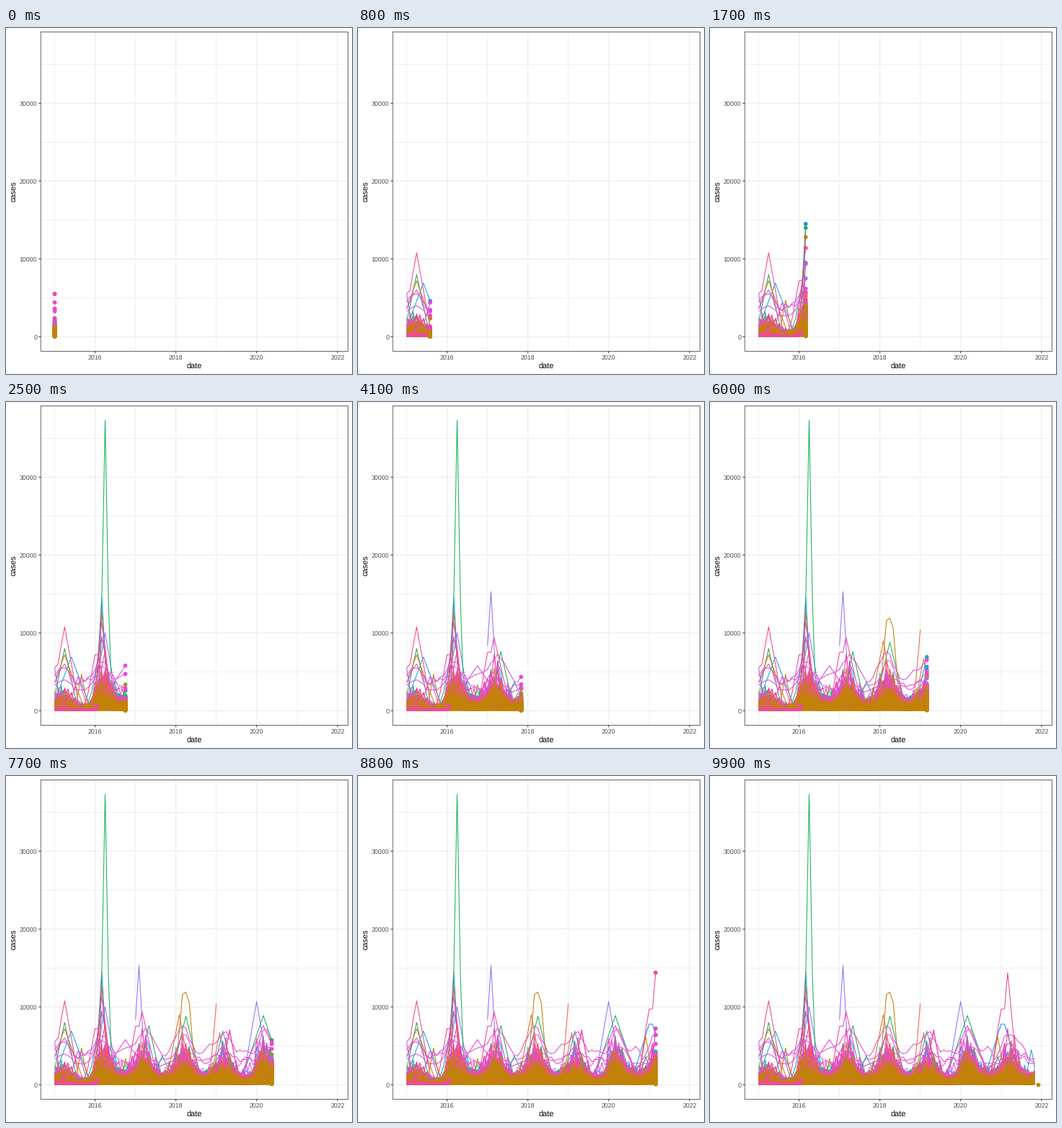
Recreate the animation shown at these times as a matplotlib script. Size 480 px wide and 480 px high, loop 10000 ms.

```python
import numpy as np
import matplotlib.pyplot as plt
from matplotlib.animation import FuncAnimation
from matplotlib.collections import LineCollection, PolyCollection

plt.rcParams["font.family"] = ["Liberation Sans", "DejaVu Sans"]
plt.rcParams["text.hinting"] = "none"

SIZE, FRAMES, MONTHS = 480, 100, 84
LEFT, RIGHT, TOP, BOTTOM = 48.2, 474.5, 5.5, 448.4
GOLD, ORANGE, RED = "#c08405", "#d6741c", "#ec6a53"
PINK, MAGENTA, PURPLE = "#f2479f", "#e54bd8", "#9b70ff"
BLUE, CYAN, TEAL = "#1e90f8", "#17a9d6", "#1fb39a"
GREEN, OLIVE = "#1db45c", "#8a9a1c"

rng = np.random.default_rng(12)
MONTH = np.arange(MONTHS)


def day(date):
    return (np.datetime64(date) - np.datetime64("2015-01-01")).astype(int)


DAYS = np.array([day(f"{2015 + m // 12}-{m % 12 + 1:02d}-01") for m in MONTH])


def px(days):
    return 67.55 + days * 387.55 / DAYS[-1]


def py(cases):
    return 428.3 - np.asarray(cases) * 0.010797


# Yearly spring wave that scales every series
SEASON = np.exp(-((MONTH - 2.4 + 6) % 12 - 6) ** 2 / 9)
PEAK = np.repeat([3000, 6200, 5600, 6000, 4700, 6200, 5600], 12)
ENV = PEAK * (0.33 + 0.67 * SEASON)


def series(scale, rough=0.34):
    return ENV * scale * np.exp(rough * rng.normal(size=MONTHS))


def crowd(n, colors, low, high, power=1.0):
    scales = low + (high - low) * rng.random(n) ** power
    return [(colors[i % len(colors)], series(s)) for i, s in enumerate(scales)]


def outbreak(color, *tents, first=0, last=MONTHS - 2):
    """A series with tent-shaped outbreaks given as (month, height, half width)."""
    vals = series(0.35)
    for month, height, width in tents:
        vals = np.maximum(vals, height * (1 - abs(MONTH - month) / width))
    return color, np.where((MONTH >= first) & (MONTH <= last), vals, np.nan)


def steady(color, level, swing):
    """A series that stays high between the waves."""
    drift = np.convolve(rng.normal(size=MONTHS + 2), np.ones(3) / 3, "valid")
    return color, level * (1 + 0.28 * drift) + swing * SEASON


back = crowd(45, [BLUE, GREEN, TEAL, PURPLE, CYAN, OLIVE], 0.1, 0.58)
back += [
    outbreak(GREEN, (3, 8000, 4), (28, 7600, 4), (39, 8800, 5)),
    outbreak(CYAN, (5, 6900, 6), (14, 9500, 4), (81, 4500, 2)),
    outbreak(PURPLE, (0, 5500, 2), (15, 10000, 4)),
    outbreak(BLUE, (14, 14500, 2.1), (72.5, 8500, 6)),
    outbreak(GREEN, (15, 37300, 1.6), (62, 8900, 7)),
    outbreak(PURPLE, (25, 15300, 2.2), first=24),
    outbreak(TEAL, (32, 3700, 4), (50, 6900, 4)),
    outbreak(PURPLE, (60, 10700, 4.2)),
]
back += crowd(60, [PINK, MAGENTA, PINK], 0.06, 0.54)
back += [
    outbreak(ORANGE, (3, 7200, 6), (14, 12800, 2), (37, 9000, 4)),
    outbreak(PINK, (0, 5500, 9), (3, 10800, 4.5), (14, 11400, 3)),
    outbreak(PINK, (12, 7200, 3), (13, 7200, 3), (24, 7500, 3), (26, 9400, 5)),
    outbreak(GOLD, (8, 4700, 2), (38, 11600, 2.5), (39, 11900, 2),
             (40, 10600, 2), (71, 6200, 2.5)),
    outbreak(RED, (48, 10400, 2), last=48),
    outbreak(RED, (49, 6700, 3), (52, 6900, 3)),
    outbreak(MAGENTA, (7, 4400, 3), (21, 5800, 9), (52, 7100, 3), (62, 7600, 8)),
    outbreak(PINK, (72, 9700, 3.5), (74, 14400, 3.1)),
    steady(MAGENTA, 3700, 2700),
    steady(MAGENTA, 2900, 2400),
    steady(MAGENTA, 2600, 1500),
]

front = crowd(85, [GOLD, ORANGE, GOLD, RED, GOLD, PINK, ORANGE, GOLD], 0.02, 0.4, 1.3)
front += crowd(26, [GOLD], 0.01, 0.32)
early = [(PINK, np.where(MONTH < 14, series(s), np.nan))
         for s in np.linspace(0.01, 0.2, 9)]

X = px(DAYS)
KEYS = np.round(DAYS / DAYS[-1] * (FRAMES - 1))


def table(group):
    vals = np.array([v for _, v in group])
    vals[:, -1] = np.nan
    return py(vals), [c for c, _ in group]


back_y, back_c = table(back)
front_y, front_c = table(front + early)
base_y = py(ENV * 0.25)

# Only one series reports in the last month
dots_y = np.vstack([back_y, front_y])
dots_c = np.array(back_c + front_c)
order = np.r_[:len(back), len(dots_y) - len(early):len(dots_y),
              len(back):len(dots_y) - len(early)]
dots_y, dots_c = dots_y[order], dots_c[order]
dots_y[-1, -1] = py(0)

fig = plt.figure(figsize=(SIZE / 72, SIZE / 72), dpi=72, facecolor="white")
ax = fig.add_axes([0, 0, 1, 1])
ax.set(xlim=(0, SIZE), ylim=(SIZE, 0))
ax.axis("off")


def rule(x, y, color, width, z=1):
    ax.plot(x, y, color=color, lw=width, zorder=z, snap=False,
            solid_capstyle="butt", solid_joinstyle="miter")


def label(x, y, text, size, color, **kw):
    ax.text(x, y, text, fontsize=size, color=color, va="baseline", **kw)


for year in range(2015, 2023):
    x = px(day(f"{year}-01-01"))
    major = year % 2 == 0
    rule([x, x], [TOP, BOTTOM], "#ebebeb", 1.07 if major else 0.75)
    if major:
        rule([x, x], [BOTTOM, BOTTOM + 2.75], "#333333", 1.07)
        label(x, 460.2, str(year), 8.8, "#4d4d4d", ha="center")
for cases in range(0, 40000, 5000):
    y = py(cases)
    major = cases % 10000 == 0
    rule([LEFT, RIGHT], [y, y], "#ebebeb", 1.07 if major else 0.75)
    if major:
        rule([LEFT - 2.75, LEFT], [y, y], "#333333", 1.07)
        label(43.2, y + 3.2, str(cases), 8.8, "#4d4d4d", ha="right")
rule([LEFT, RIGHT, RIGHT, LEFT, LEFT], [TOP, TOP, BOTTOM, BOTTOM, TOP],
     "#333333", 0.75, z=6)
label(261.3, 472.4, "date", 11, "black", ha="center")
label(14.6, 227, "cases", 11, "black", ha="center", rotation=90, rotation_mode="anchor")

style = dict(linewidths=1.07, joinstyle="round", capstyle="butt")
back_lines = LineCollection([], colors=back_c, zorder=2, **style)
base = PolyCollection([], facecolors=GOLD, edgecolors="none", zorder=3)
front_lines = LineCollection([], colors=front_c, zorder=4, **style)
for artist in (back_lines, base, front_lines):
    ax.add_collection(artist, autolim=False)
dots = ax.scatter([], [], s=5.8 ** 2, linewidths=0, zorder=5)


def at(vals, t):
    """Values at fractional month t."""
    k, f = int(t), t % 1
    if f == 0:
        return vals[..., k]
    return vals[..., k] * (1 - f) + vals[..., k + 1] * f


def trails(vals, t):
    k = int(t) + 1
    xs = np.append(X[:k], at(X, t))
    ys = np.column_stack([vals[:, :k], at(vals, t)])
    return [np.column_stack([xs, y]) for y in ys]


def update(i):
    t = np.interp(i, KEYS, MONTH)
    back_lines.set_segments(trails(back_y, t))
    front_lines.set_segments(trails(front_y, t))

    area = trails(base_y[None], min(t, MONTHS - 2))[0]
    floor = py(0) + 0.5
    base.set_verts([np.vstack([area, [area[-1, 0], floor], [area[0, 0], floor]])])

    y = at(dots_y, t)
    seen = np.isfinite(y)
    dots.set_offsets(np.column_stack([np.full(seen.sum(), at(X, t)), y[seen]]))
    dots.set_facecolors(list(dots_c[seen]))
    return back_lines, base, front_lines, dots


anim = FuncAnimation(fig, update, frames=FRAMES, interval=100, repeat=True,
                     repeat_delay=0, blit=False)
plt.show()
```
